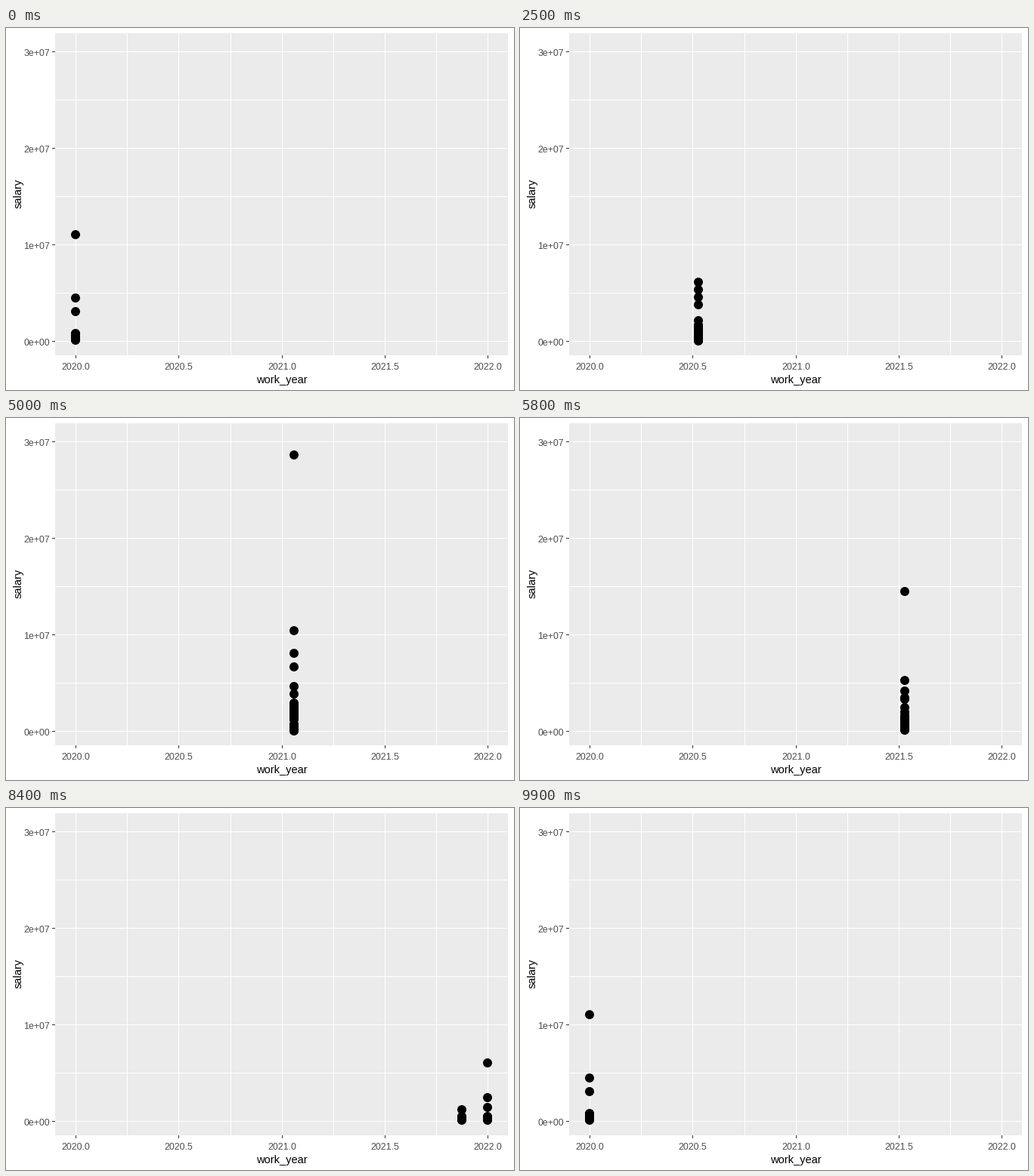
Animation, 672 px wide and 480 px high, one loop 10000 ms. Source, as a matplotlib script:

```python
import math

import matplotlib.pyplot as plt
import numpy as np
from matplotlib.animation import FuncAnimation
from matplotlib.patches import PathPatch, Rectangle
from matplotlib.path import Path

W, H, DPI = 672, 480, 96
FRAMES, INTERVAL = 100, 100
LEFT, TOP, RIGHT, BOTTOM = 65, 7, 664, 434
RADIUS = 6

plt.rcParams["font.family"] = "Liberation Sans"
rng = np.random.default_rng(2020)


def px(year):
    return 92.72 + 272.38 * (year - 2020)


def py(millions):
    return 415.08 - 12.774 * millions


def salaries(count, low, high, first, top):
    """Skewed ordinary salaries (in millions), top earners from row `first`."""
    values = low + (high - low) * rng.random(count) ** 3
    values[first:first + len(top)] = top
    return values


pay = {
    2020: salaries(72, 0.008, 0.75, 0, [11, 4.45, 3, 0.72]),
    2021: salaries(217, 0.004, 0.7, 62,
                   [11, 8.5, 7, *np.geomspace(3, 1.65, 7),
                    30.4, 4.9, 4, *np.geomspace(1.6, 1.2, 4)]),
    2022: salaries(318, 0.01, 0.45, 160, [6, 2.4, 1.4]),
}


def move(start, end, t):
    """Rows present in both years travel in a straight line; the rest of the
    starting year waits until the move is over."""
    if t >= 1:
        return [(end, pay[end])]
    if t <= 0:
        return [(start, pay[start])]
    a, b = pay[start], pay[end]
    n = min(len(a), len(b))
    groups = [(start + (end - start) * t, a[:n] + (b[:n] - a[:n]) * t)]
    if len(a) > n:
        groups.append((start, a[n:]))
    return groups


def groups_at(i):
    if i < 49:
        return move(2020, 2021, (i - 16) / 17)
    if i < 83:
        return move(2021, 2022, (i - 49) / 17)
    return move(2022, 2020, (i - 83) / 16)


fig = plt.figure(figsize=(W / DPI, H / DPI), dpi=DPI, facecolor="white")
ax = fig.add_axes([0, 0, 1, 1])
ax.set_xlim(0, W)
ax.set_ylim(H, 0)
ax.axis("off")


def box(x, y, w, h, color):
    ax.add_patch(Rectangle((x, y), w, h, facecolor=color, linewidth=0,
                           antialiased=False))


def label(x, y, text, ha="center", size=9.3, color="#4d4d4d", **kw):
    ax.text(x, y, text, ha=ha, va="baseline", fontsize=size, color=color, **kw)


box(LEFT, TOP, RIGHT - LEFT, BOTTOM - TOP, "#ebebeb")
for k in range(7):
    box(LEFT, math.floor(py(5 * k)), RIGHT - LEFT, 1, "white")
for k in range(9):
    box(math.floor(px(2020 + k / 4)), TOP, 1, BOTTOM - TOP, "white")

for k in range(4):
    y = math.floor(py(10 * k))
    box(LEFT - 4, y, 4, 1, "#333333")
    label(58.3, y + 6, f"{k}e+0{7 if k else 0}", ha="right")
for k in range(5):
    year = 2020 + k / 2
    x = math.floor(px(year))
    box(x, BOTTOM, 1, 4, "#333333")
    label(x, 453, f"{year:.1f}")

label(364.8, 471, "work_year", size=11, color="black")
label(21, 219.7, "salary", size=11, color="black", rotation=90,
      rotation_mode="anchor")

dots = PathPatch(Path.circle((0, 0), RADIUS), facecolor="black", linewidth=0)
ax.add_patch(dots)


def update(i):
    circles = []
    for year, values in groups_at(i):
        x = math.floor(px(year))
        for y in np.unique(np.floor(py(values))):
            circles.append(Path.circle((x, y), RADIUS))
    dots.set_path(Path.make_compound_path(*circles))
    return [dots]


def init():
    return update(0)


anim = FuncAnimation(fig, update, frames=FRAMES, interval=INTERVAL,
                     init_func=init, repeat=True, repeat_delay=0, blit=False)
plt.show()
```
